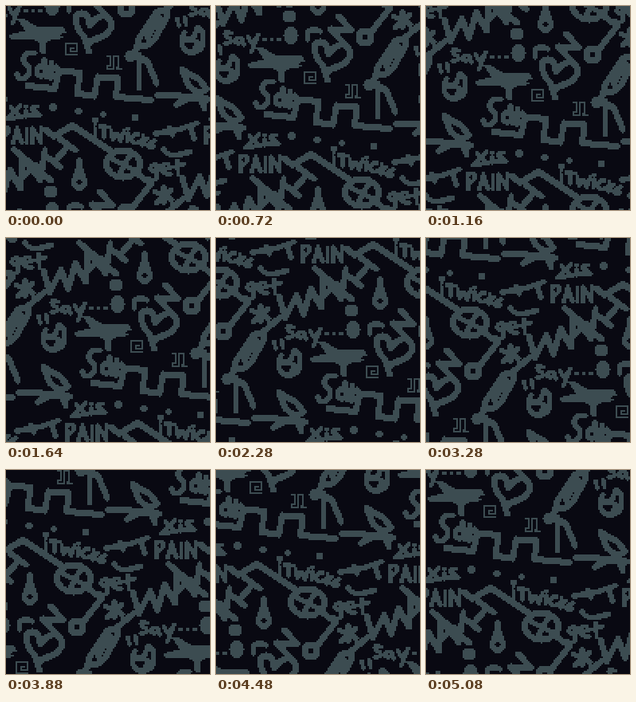
These frames come from a looping animation (256 px wide and 256 px high, 5120 ms). An HTML page with a canvas:

```html
<!DOCTYPE html>
<html lang="en">
<head>
<meta charset="utf-8">
<title>Drifting doodles</title>
<style>
  html, body { margin: 0; width: 100%; height: 100%; overflow: hidden; background: #090912; }
  canvas { display: block; width: 200vw; height: 200vh; image-rendering: pixelated; }
</style>
</head>
<body>
<canvas id="wall" width="256" height="256"></canvas>
<script>
const TILE = 256, CELLS = 128, LOOP = 5120;
const INK = [60, 76, 81];

// Stroked doodles by pen width; coordinates are stage pixels within one tile.
const bold = [
  // heart
  'M105 24Q104 10 95 9Q86 9 88 20Q90 32 98 38L104 57M106 23Q112 14 123 12Q133 14 132 27Q128 36 117 40Q106 43 102 49',
  // square wave
  'M27 100L61 104L67 81L93 84L89 110L111 113L115 89L141 91L138 114L182 118',
  // guitar, neck and legs
  'M165 50Q164 42 172 33L186 12Q192 2 201 6Q205 11 198 21L186 42Q176 53 165 50M200 5L222 -14',
  'M158 61L166 51M167 62L167 102M170 66Q178 66 181 78L189 97',
  // star
  'M190 112L220 113L254 117M221 80L242 92L252 104L214 124M221 80L229 100L242 110L249 128',
  // mountain, wheel and ring
  'M50 155L60 164L83 150L130 181M167 212L182 223L157 255',
  'M126 198a21 17 0 1 0 42 0a21 17 0 1 0 -42 0',
  'M143 259a8 8 0 1 0 16 0a8 8 0 1 0 -16 0',
  // zigzag and crossing line
  'M221 215L229 242L243 214L252 238L261 206L274 229L277 191L299 218L305 181M10 180L56 219M20 214L38 200',
  // tilted letters
  'M68 167L87 181M79 175L60 196M51 189L68 202M124 266L108 249L134 250L118 233',
];

const medium = [
  // large initials
  'M36 59Q24 57 22 66Q22 71 28 76Q32 86 24 90Q17 93 14 86',
  'M39 82a5 6 0 1 0 10 0a5 6 0 1 0 -10 0M48 68L51 89M57 71L56 90M63 76L55 82L62 89',
  // small hook and smile
  'M79 262L79 252Q86 247 95 252M198 180Q201 188 216 187L231 183',
  // bottle
  'M92 193L92 208M85 221a7 7 0 1 0 14 0a7 7 0 1 0 -14 0M88 211L96 211',
  // wheel spokes and guitar string
  'M131 191L163 207M156 186L142 212M177 40L193 14',
  // dash and T
  'M188 160L212 156M205 153L209 162M217 155L240 147M232 152L236 167',
  // asterisk
  'M198 228L198 246M187 233L208 243M207 231L189 247',
  // scribble
  'M224 33Q218 46 224 55Q234 63 244 54Q250 44 246 31Q240 23 238 33Q236 44 226 42M236 43Q245 46 237 54'
];

const fine = [
  // say
  'M239 254Q233 250 231 255Q232 258 238 261Q240 267 231 267M253 261Q245 258 244 264Q246 270 253 264L255 269M260 258L263 265L270 262M273 256L264 278',
  // short row at the left
  'M6 126L19 140M18 125L3 141M25 131L25 139M1 142L20 139M29 137L43 137M39 126Q31 125 33 131Q43 133 39 138',
  // sloping word
  'M112 154L112 164M118 151L130 152M124 151L123 165M132 156L134 168L139 160L144 169L148 157M153 160L152 170M166 161Q157 160 158 169Q161 174 167 171M172 163L171 175M178 166L172 171L179 176M187 169Q180 169 182 173Q189 176 181 178',
  // capitals
  'M251 172L250 153Q260 149 260 157Q257 164 250 163M265 172L270 153L276 172M266 166L274 166M282 154L282 171M289 172L289 153L300 171L300 152',
  // get
  'M191 200Q181 197 181 205Q185 211 191 202L189 216Q184 222 179 216M196 206L206 203Q203 195 197 199Q193 212 207 211M215 194L216 211M210 202L224 198',
  // twin ticks
  'M215 16L217 25M224 14L226 23'
];

const hairline = [
  'M89 61L75 61L75 47L89 47L89 57L81 57L81 53L85 53',
  'M127 63L131 63L131 75L127 75L127 79L135 79L135 63L141 63L141 75L139 79L145 79'
];

// x, y, horizontal radius, vertical radius
const dots = [
  [156, 63, 7, 7], [56, 233, 8, 8], [58, 257, 9, 11], [92, 206, 6, 5],
  [59, 127, 5, 5], [91, 132, 5, 4], [122, 136, 4, 4], [112, 143, 4, 4], [162, 140, 5, 4],
  [25, 6, 3, 3], [34, 6, 3, 3], [43, 6, 3, 3],
  [112, 148, 3, 3], [25, 126, 3, 3], [153, 154, 3, 3], [209, 249, 3, 3]
];

const bird = 'M16 16L24 18L37 26L72 28L75 33L62 36L72 39L57 42L50 44L49 59L44 59L43 45L33 41L7 42L5 37L25 32Z';

function drawTile(g) {
  g.lineCap = g.lineJoin = 'round';
  const pens = [[bold, 7.8], [medium, 6.8], [fine, 5.4], [hairline, 2]];
  for (const [paths, width] of pens) {
    g.lineWidth = width;
    for (const d of paths) g.stroke(new Path2D(d));
  }
  const body = new Path2D(bird);
  g.fill(body);
  g.stroke(body);
  for (const [x, y, rx, ry] of dots) {
    g.beginPath();
    g.ellipse(x, y, rx, ry, 0, 0, Math.PI * 2);
    g.fill();
  }
}

function makeTile() {
  const tile = document.createElement('canvas');
  tile.width = tile.height = CELLS;
  const g = tile.getContext('2d');
  for (const dx of [-TILE, 0, TILE]) {
    for (const dy of [-TILE, 0, TILE]) {
      g.setTransform(0.5, 0, 0, 0.5, dx / 2, dy / 2);
      drawTile(g);
    }
  }
  // Harden the edges into flat cells.
  const image = g.getImageData(0, 0, CELLS, CELLS);
  for (let i = 0; i < image.data.length; i += 4) {
    const alpha = image.data[i + 3] > 120 ? 255 : 0;
    image.data.set([...INK, alpha], i);
  }
  g.putImageData(image, 0, 0);
  return tile;
}

const wall = document.getElementById('wall');
const ctx = wall.getContext('2d');
ctx.fillStyle = ctx.createPattern(makeTile(), 'repeat');
ctx.fillRect(0, 0, wall.width, wall.height);

wall.animate(
  [{ transform: 'translate(-50%, -50%)' }, { transform: 'translate(0, 0)' }],
  { duration: LOOP, iterations: Infinity, easing: `steps(${CELLS}, end)` }
);
</script>
</body>
</html>
```
